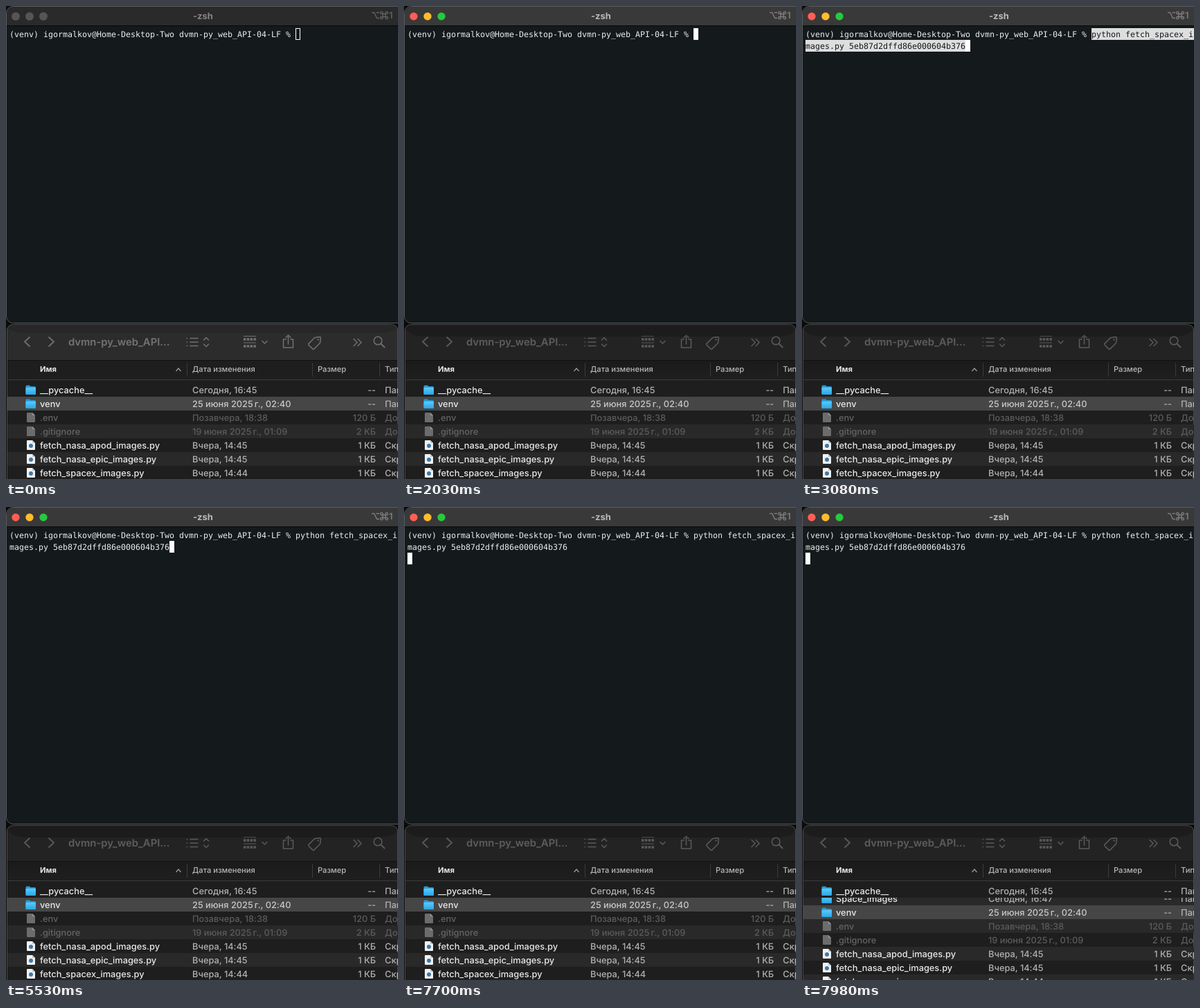
Recreate the animation shown at these times as an HTML page. Size 566 px wide and 684 px high, loop 8000 ms.

```html
<!DOCTYPE html>
<html lang="ru">
<head>
<meta charset="utf-8">
<title>Terminal and file list</title>
<style>
  html, body { margin: 0; width: 100%; height: 100%; overflow: hidden; background: #0b0b0b; }
  svg { display: block; width: 566px; height: 684px; }
  text { font: 500 12.8px Inter, "Noto Sans", sans-serif; font-feature-settings: "calt" 0; text-rendering: geometricPrecision; }
  .term text { font: 11.63px "DejaVu Sans Mono", "Noto Sans Mono", monospace; fill: #eceeef; }
  .term .dark text { fill: #14191c; }
  .head text { font-size: 11.15px; fill: #b9b9b9; }
  .head .sorted { font-weight: 700; fill: #e6e6e6; }
  .icons { fill: none; stroke: #707070; stroke-width: 1.5; stroke-linecap: round; stroke-linejoin: round; }
  .lights { stroke: #000; stroke-opacity: .16; stroke-width: .8; }
  .end { text-anchor: end; }

  .idle, .active, .wait, .paste, .typed, .typed-cursor, .run, .before, .after, .rows { animation: 8s step-end infinite; }
  .idle { animation-name: idle; }
  .active { animation-name: active; }
  .wait { animation-name: wait; }
  .paste { animation-name: paste; }
  .typed { animation-name: typed; }
  .typed-cursor { animation-name: typed-cursor; }
  .run { animation-name: run; }
  .before { animation-name: before; }
  .after { animation-name: after; }
  .rows { animation-name: insert; }

  @keyframes idle { 0% { visibility: visible } 25.375%, 100% { visibility: hidden } }
  @keyframes active { 0% { visibility: hidden } 25.375%, 100% { visibility: visible } }
  @keyframes wait { 0% { visibility: hidden } 25.375% { visibility: visible } 37.625%, 100% { visibility: hidden } }
  @keyframes paste { 0% { visibility: hidden } 37.625% { visibility: visible } 69.125%, 100% { visibility: hidden } }
  @keyframes typed { 0% { visibility: hidden } 69.125%, 100% { visibility: visible } }
  @keyframes typed-cursor { 0% { visibility: hidden } 69.125% { visibility: visible } 96.25%, 100% { visibility: hidden } }
  @keyframes run { 0% { visibility: hidden } 96.25%, 100% { visibility: visible } }
  @keyframes before { 0% { visibility: visible } 98%, 100% { visibility: hidden } }
  @keyframes after { 0% { visibility: hidden } 98%, 100% { visibility: visible } }
  @keyframes insert {
    0% { transform: translateY(0) }
    98% { transform: translateY(1px) }
    98.875% { transform: translateY(3px) }
    99.75%, 100% { transform: translateY(11px) }
  }
</style>
</head>
<body>
<svg viewBox="0 0 566 684">
  <defs>
    <clipPath id="list"><rect x="2" y="565" width="564" height="119"/></clipPath>
    <clipPath id="window"><rect x="1" y="1" width="580" height="457" rx="10"/></clipPath>
    <linearGradient id="folder" x2="0" y2="1">
      <stop stop-color="#5ccbfa"/><stop offset="1" stop-color="#2ba5e4"/>
    </linearGradient>
    <linearGradient id="shade" x2="0" y2="1">
      <stop stop-color="#000" stop-opacity=".3"/><stop offset="1" stop-color="#000" stop-opacity="0"/>
    </linearGradient>
    <g id="dir">
      <path d="M28.500 5q0-1.500 1.500-1.500h4l1.500 1.500h6q1.500 0 1.500 1.500v9q0 1.500-1.500 1.500h-11.500q-1.500 0-1.500-1.500z" fill="#249bd8"/>
      <rect x="28.500" y="6.800" width="14.500" height="10.200" rx="1.300" fill="url(#folder)"/>
    </g>
    <path id="page" d="M31 3h7l4 4v9q0 1-1 1h-10q-1 0-1-1v-12q0-1 1-1z"/>
    <g id="doc"><use href="#page" fill="#6c6c6c"/><path d="M38 3v4h4z" fill="#949494"/></g>
    <g id="script">
      <use href="#page" fill="#f1f1f1"/><path d="M38 3v4h4z" fill="#c4c4c4"/>
      <circle cx="36" cy="11" r="3" fill="#3d79a9"/>
    </g>
  </defs>

  <!-- terminal -->
  <g class="term">
    <g clip-path="url(#window)">
      <rect width="566" height="459" fill="#14191c"/>
      <rect width="566" height="28" fill="#3a3939"/>
      <rect class="idle" width="566" height="28" fill="#2b2a2a"/>
      <rect y="28" width="566" height="1" fill="#080a0c"/>
    </g>
    <rect x=".5" y=".5" width="580" height="458" rx="10" fill="none" stroke="#5b5d5f"/>
    <g class="idle" fill="#555">
      <circle cx="14" cy="15" r="6"/><circle cx="34" cy="15" r="6"/><circle cx="54" cy="15" r="6"/>
    </g>
    <g class="active lights">
      <circle cx="14" cy="15" r="5.800" fill="#ff5f57"/>
      <circle cx="34" cy="15" r="5.800" fill="#febc2e"/>
      <circle cx="54" cy="15" r="5.800" fill="#28c840"/>
    </g>
    <g id="caption"></g>

    <text x="5" y="45">(venv) igormalkov@Home-Desktop-Two dvmn-py_web_API-04-LF %</text>
    <rect class="idle" x="418.500" y="32.500" width="6" height="16" fill="none" stroke="#fff"/>
    <rect class="wait" x="418" y="32" width="7" height="17" fill="#fff"/>
    <g class="paste dark">
      <path d="M418 32h148v17h-148zM5 49h231v17h-231z" fill="#dedede"/>
      <rect x="236" y="49" width="7" height="17" fill="#fff"/>
      <text x="418" y="45">python fetch_spacex_i</text>
      <text x="5" y="62">mages.py 5eb87d2dffd86e000604b376</text>
    </g>
    <g class="typed">
      <text x="418" y="45">python fetch_spacex_i</text>
      <text x="5" y="62">mages.py 5eb87d2dffd86e000604b376</text>
    </g>
    <rect class="typed-cursor" x="236" y="49" width="7" height="17" fill="#fff"/>
    <rect class="run" x="5" y="66" width="7" height="17" fill="#fff"/>
  </g>

  <!-- file list -->
  <path d="M1 684V470q0-9 10-9H556q10 0 10 9V684z" fill="#1e1e1e"/>
  <path d="M1 512V470q0-9 10-9H556q10 0 10 9V512z" fill="#2d2c2c"/>
  <rect x="1" y="512" width="565" height="1" fill="#111"/>
  <g class="icons">
    <path stroke-width="1.800" d="M34 479l-7 6.500 7 6.500M62 479l7 6.500-7 6.500"/>
    <path d="M266 480.500h11M266 486h11M266 491.500h11M261 480.500h.5M261 486h.5M261 491.500h.5M285.500 483l3.500-3.500 3.500 3.500M285.500 489l3.500 3.500 3.500-3.500M370 484.500l3.500 3.500 3.500-3.500"/>
    <path stroke-width="1.200" stroke-linecap="butt" d="M343 477.500h18M343 487h18"/>
    <path stroke-width="3.500" stroke-linecap="butt" stroke-dasharray="3.500 1.300" d="M343 482h18M343 492h18"/>
    <path d="M404 482h-3.500v12h14v-12h-3.500M407.500 489v-12.500M404 479.500l3.500-3.500 3.500 3.500"/>
    <g transform="rotate(-45 447 486)">
      <path d="M438.500 480.500h11.500q1 0 2 1l4.500 3.500q1 1 0 2l-4.500 3.500q-1 1-2 1h-11.500q-1.500 0-1.500-1.500v-8q0-1.500 1.500-1.500z"/>
      <circle cx="452" cy="486" r=".5"/>
    </g>
    <path d="M502 481.500l5 5-5 5M508 481.500l5 5-5 5"/>
    <circle cx="537" cy="484" r="5.800"/><path stroke-width="1.800" d="M541.500 488.500l5 5"/>
  </g>
  <text x="90" y="491" style="font-size:14.800px;font-weight:600" fill="#747474">dvmn-py_web_API...</text>
  <path class="idle" d="M2 461h564v5q-8 7-28 7H30q-20 0-28-7z" fill="#000" opacity=".12"/>
  <g class="active">
    <rect x="1" y="461" width="565" height="51" fill="#000" opacity=".2"/>
    <path d="M2 461h564v6q-7 11-30 11H32q-23 0-30-11z" fill="#000" opacity=".2"/>
    <rect x="1" y="513" width="565" height="20" fill="url(#shade)" opacity=".4"/>
  </g>
  <path d="M1.500 684V470q0-9.500 10-9.500H555.500q10 0 10 9.500V684" fill="none" stroke="#4d4d4d"/>

  <g class="head">
    <text class="sorted" x="49" y="529">Имя</text>
    <text x="269" y="529">Дата изменения</text>
    <text x="450" y="529">Размер</text>
    <text x="547" y="529">Тип</text>
    <path d="M245.500 528l3.500-4 3.500 4" fill="none" stroke="#a0a0a0" stroke-width="1.200"/>
    <path d="M261.500 516v20M442.500 516v20M539.500 516v20M2 540.500h564" stroke="#3b3b3b"/>
  </g>
  <g id="top"></g>
  <g clip-path="url(#list)"><g class="rows" id="rows"></g></g>
</svg>
<script>
  const get = id => document.getElementById(id);

  const caption = (cls, color, titleColor) => `
    <g class="${cls}" fill="none" stroke="${color}" stroke-width="1.400">
      <path d="M528 9.500h3.500l4 8h3.500M534.500 9.500h4.500"/>
      <path d="M544 11.500h4v4h-4zM544 11.500h-1.700a1.700 1.700 0 1 1 1.700-1.700zM548 11.500v-1.700a1.700 1.700 0 1 1 1.700 1.700zM548 15.500h1.700a1.700 1.700 0 1 1-1.700 1.700zM544 15.500v1.700a1.700 1.700 0 1 1-1.700-1.700z"/>
      <g stroke="none">
        <text x="270" y="19" style="font:700 13px Inter,sans-serif;fill:${titleColor}">-zsh</text>
        <text x="553" y="18" style="font:600 13px Inter,sans-serif;fill:${color}">1</text>
      </g>
    </g>`;
  get("caption").innerHTML = caption("idle", "#606060", "#858585") + caption("active", "#7d7d7d", "#b9b9b9");

  const rowTop = i => 545 + 20 * i;
  const band = (y, fill) => `<rect x="2" y="${y}" width="564" height="20" fill="${fill}"/>`;

  const row = (y, [icon, name, date, size, kind, picked]) => {
    const dim = icon === "doc";
    const minor = dim ? "#5c5c5c" : "#b2b2b2";
    return `<g transform="translate(0 ${y})">
      ${picked ? band(0, "#464646") : ""}
      <use href="#${icon}"/>
      <text x="49" y="15" fill="${dim ? "#646464" : "#e9e9e9"}">${name}</text>
      <text x="269" y="15" fill="${picked ? "#c8c8c8" : minor}">${date}</text>
      <text class="end" x="534" y="15" fill="${minor}">${size}</text>
      <text x="547" y="15" fill="${minor}">${kind}</text>
    </g>`;
  };
  const first = ["dir", "__pycache__", "Сегодня, 16:45", "--", "Папка"];
  const files = [
    ["dir", "Space_images", "Сегодня, 16:47", "--", "Папка"],
    ["dir", "venv", "25 июня 2025\u2009г., 02:40", "--", "Папка", true],
    ["doc", ".env", "Позавчера, 18:38", "120 Б", "Документ"],
    ["doc", ".gitignore", "19 июня 2025\u2009г., 01:09", "2 КБ", "Документ"],
    ["script", "fetch_nasa_apod_images.py", "Вчера, 14:45", "1 КБ", "Скрипт"],
    ["script", "fetch_nasa_epic_images.py", "Вчера, 14:45", "1 КБ", "Скрипт"],
    ["script", "fetch_spacex_images.py", "Вчера, 14:44", "1 КБ", "Скрипт"]
  ];

  // The inserted row flips the stripe order below it.
  const stripes = (cls, parity) => `<g class="${cls}">` +
    files.map((_, i) => i % 2 === parity ? band(rowTop(i), "#292929") : "").join("") + "</g>";

  get("top").innerHTML = row(rowTop(0), first);
  get("rows").innerHTML = stripes("before", 1) + stripes("after", 0) +
    files.map((file, i) => row(rowTop(i), file)).join("");
</script>
</body>
</html>
```
